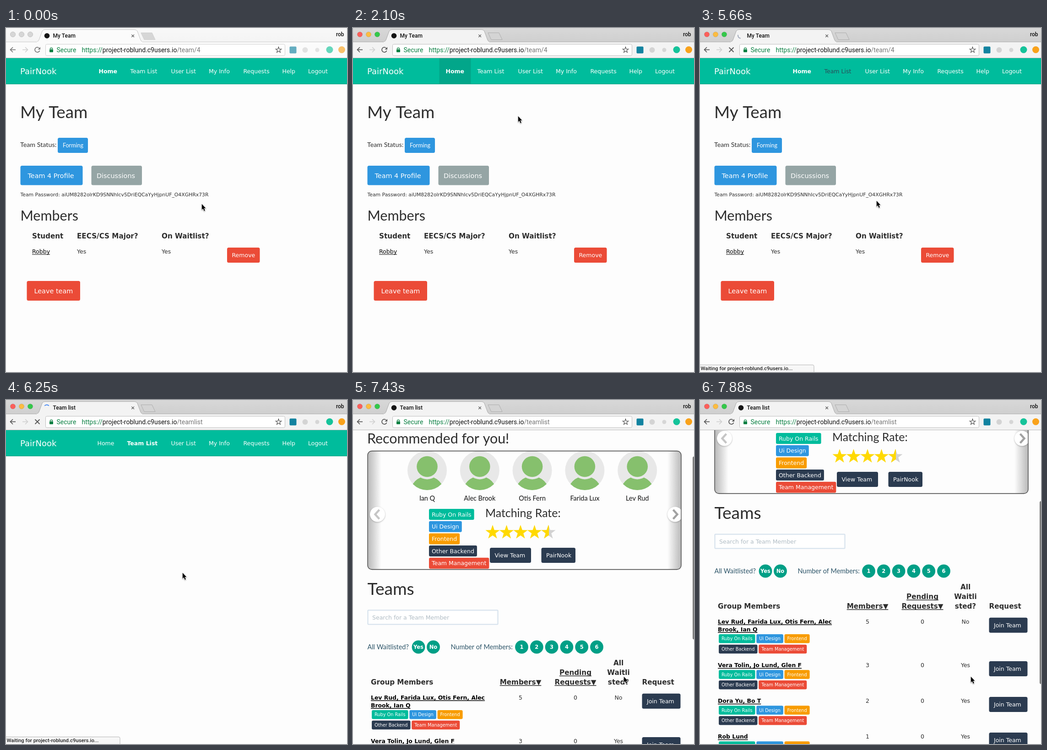
Recreate the animation shown at these times as an HTML page with a canvas. Size 745 by 752 pixels, loop 8 s.

```html
<!DOCTYPE html>
<html lang="en">
<head>
<meta charset="utf-8">
<title>My Team</title>
<style>
html, body { margin: 0; width: 100%; height: 100%; overflow: hidden; background: #fdfdfd; }
canvas { display: block; width: 745px; height: 752px; }
</style>
</head>
<body>
<canvas id="stage" width="745" height="752"></canvas>
<script>
const ctx = document.getElementById('stage').getContext('2d');
const LOOP = 8000, TICK = 148.5;
const TEAL = '#00bc9c', BLUE = '#2e96df', ORANGE = '#f89c00', NAVY = '#2b3b50',
      RED = '#eb4b37', GREY = '#95a5a5', INK = '#2d2d2d', WHITE = '#fff', PAGE = '#fdfdfd';
const HOST = 'project-roblund.c9users.io';

// Ticks at which the story moves on.
const FOCUS = 8, HOVER = 15, CLICK = 20, COMMIT = 42, PAINT = 43, LOADED = 46;

const cursorPath = [
  [8, 427, 384], [10, 392, 285], [13, 392, 285], [14, 360, 192], [15, 379, 99],
  [16, 342, 97], [18, 303, 96], [21, 303, 96], [24, 395, 262], [26, 385, 377],
  [43, 385, 377], [47, 591, 604]
];
const scrollPath = [[49, 0], [50, 96], [51, 194], [52, 237], [53, 262]];

const sans = px => `${px}px "DejaVu Sans", Verdana, sans-serif`;
const bold = px => 'bold ' + sans(px);
const lato = px => `${px}px Lato, sans-serif`;
const ui = px => `${px}px Roboto, sans-serif`;
const uiMedium = px => '500 ' + ui(px);

function along(path, tick) {
  if (tick <= path[0][0]) return path[0].slice(1);
  for (let i = 1; i < path.length; i++) {
    const [a, ...from] = path[i - 1], [b, ...to] = path[i];
    if (tick <= b) return from.map((v, k) => v + (to[k] - v) * (tick - a) / (b - a));
  }
  return path[path.length - 1].slice(1);
}

function text(str, x, y, font, color = INK, align = 'left') {
  ctx.font = font;
  ctx.fillStyle = color;
  ctx.textAlign = align;
  ctx.fillText(str, x, y);
  return ctx.measureText(str).width;
}

function underlined(str, x, y, font, color, align = 'left', thickness = 1.5) {
  const w = text(str, x, y, font, color, align);
  ctx.fillRect(align === 'center' ? x - w / 2 : x, y + 1.5, w, thickness);
}

function shape(fill, stroke, width = 1) {
  if (fill) { ctx.fillStyle = fill; ctx.fill(); }
  if (stroke) { ctx.strokeStyle = stroke; ctx.lineWidth = width; ctx.stroke(); }
}

function box(x, y, w, h, r, fill, stroke, width) {
  ctx.beginPath();
  ctx.roundRect(x, y, w, h, r);
  shape(fill, stroke, width);
}

function disc(x, y, r, fill, stroke, width) {
  ctx.beginPath();
  ctx.arc(x, y, r, 0, 2 * Math.PI);
  shape(fill, stroke, width);
}

function poly(points, fill, stroke, width, open) {
  ctx.beginPath();
  points.forEach(([x, y]) => ctx.lineTo(x, y));
  if (!open) ctx.closePath();
  shape(fill, stroke, width);
}

function star(x, y, r, fill, stroke, width) {
  poly(Array.from({ length: 10 }, (_, i) => {
    const a = i * Math.PI / 5 - Math.PI / 2, d = i % 2 ? r * 0.4 : r;
    return [x + d * Math.cos(a), y + d * Math.sin(a)];
  }), fill, stroke, width);
}

function button(label, x, y, w, h, color, font = sans(12.5), pad = 10.5, drop = 20.8) {
  box(x, y, w, h, 3.5, color);
  text(label, x + pad, y + drop, font, WHITE);
}

function tag(label, x, y, px, h) {
  const pad = 6;
  ctx.font = sans(px);
  const w = ctx.measureText(label).width + 2 * pad;
  box(x, y, w, h, 3, TAGS[label]);
  text(label, x + pad, y + h / 2 + px * 0.36, sans(px), WHITE);
  return w;
}

const TAGS = {
  'Ruby On Rails': TEAL, 'Ui Design': BLUE, 'Frontend': ORANGE,
  'Other Backend': NAVY, 'Team Management': RED
};

function navbar(tick) {
  ctx.fillStyle = TEAL;
  ctx.fillRect(0, 66, 745, 57);
  ctx.fillStyle = 'rgba(0,70,55,.25)';
  ctx.fillRect(0, 122, 745, 1);
  if (tick >= FOCUS && tick < CLICK) {
    ctx.fillStyle = '#02a68a';
    ctx.fillRect(188.5, 66, 69, 57);
  }
  text('PairNook', 31, 101, sans(18), WHITE);
  const listPage = tick >= COMMIT;
  const links = [['Home', listPage ? 199.5 : 202.5], ['Team List', listPage ? 264.5 : 271.5],
    ['User List', 360.5], ['My Info', 443], ['Requests', 518.5], ['Help', 603.5], ['Logout', 660]];
  const current = listPage ? 'Team List' : 'Home';
  const touched = tick === HOVER ? 'User List' : tick > HOVER && !listPage ? 'Team List' : '';
  for (const [name, x] of links) {
    text(name, x, 99, (name === current ? bold : sans)(12.5), name === touched ? '#2c4a58' : WHITE);
  }
}

function teamPage() {
  text('My Team', 31, 197, lato(36.8));
  text('Team Status:', 31, 260, lato(14.3));
  button('Forming', 113, 240, 66, 33, BLUE, lato(12.5), 11, 21);
  button('Team 4 Profile', 31.5, 301, 136, 42.5, BLUE, sans(14.4), 16, 26.5);
  button('Discussions', 186.5, 301, 110.5, 42.5, GREY, sans(14.4), 11.5, 26.5);
  text('Team Password: aiUM8282olrKD9SNNhIcv5DriEQCaYyHjpnUF_O4XGHRx73R', 31.5, 368, sans(10.85));
  text('Members', 31.5, 421, lato(30.5));
  [['Student', 57], ['EECS/CS Major?', 155], ['On Waitlist?', 340]]
    .forEach(([label, x]) => text(label, x, 460, bold(15.2)));
  underlined('Robby', 57, 493, sans(12.5), '#000', 'left', 1);
  text('Yes', 155, 493, sans(12.5));
  text('Yes', 340, 493, sans(12.5));
  button('Remove', 483, 480, 71.5, 33, RED);
  button('Leave team', 45.5, 553, 116.5, 43, RED, sans(14.4), 16, 27);
}

function avatar(name, x) {
  const y = 250, green = '#86c06d', pale = '#e8e8e8';
  ctx.save();
  disc(x, y, 43, pale);
  ctx.clip();
  disc(x, 299.5, 37, green);
  disc(x, 241.5, 28, pale);
  disc(x, 241.5, 22.8, green);
  ctx.restore();
  text(name, x, 316, lato(14.4), '#111', 'center');
}

function sideShade(x, outer, inner) {
  const g = ctx.createLinearGradient(outer, 0, inner, 0);
  g.addColorStop(0, '#b8b8b8');
  g.addColorStop(1, PAGE);
  ctx.fillStyle = g;
  ctx.fillRect(x, 207, 31, 260);
}

function arrowKnob(x, dir, color) {
  ctx.save();
  ctx.shadowColor = 'rgba(0,0,0,.28)';
  ctx.shadowBlur = 3;
  ctx.shadowOffsetY = 1;
  disc(x, 346, 16.5, WHITE);
  ctx.restore();
  poly([[x - 4 * dir, 336], [x + 5 * dir, 346], [x - 4 * dir, 356]], null, color, 4.5, true);
}

function carousel() {
  text('Recommended for you!', 31, 191, lato(30.4));
  ctx.save();
  ctx.beginPath();
  ctx.roundRect(32, 207.5, 685, 259, 9);
  ctx.clip();
  sideShade(32, 32, 62);
  sideShade(686, 717, 687);
  ['Ian Q', 'Alec Brook', 'Otis Fern', 'Farida Lux', 'Lev Rud']
    .forEach((name, i) => avatar(name, 162 + i * 114.8));
  arrowKnob(53.5, -1, '#c6c6c6');
  arrowKnob(703.5, 1, '#a2a2a2');
  ctx.restore();
  Object.keys(TAGS).forEach((label, i) => tag(label, 166, 334 + i * 26.7, 12.5, 24));
  text('Matching Rate:', 289, 352, lato(24.9));
  const starY = 385.5, starR = 16.4;
  for (let i = 0; i < 5; i++) star(305 + i * 30.5, starY, starR, i < 4 ? '#ffd900' : '#d2d2d2');
  ctx.save();
  ctx.beginPath();
  ctx.rect(408, 366, 20, 40);
  ctx.clip();
  star(427, starY, starR, '#ffd900');
  ctx.restore();
  button('View Team', 299, 419, 90, 33, NAVY);
  button('PairNook', 411.5, 419, 74.5, 33, NAVY);
  box(32, 207.5, 685, 259, 9, null, '#3a3a3a', 1.3);
}

function teamRow(names, y, members, waitlisted) {
  text(members, 366, y, sans(12.5), INK, 'center');
  text('0', 486, y, sans(12.5), INK, 'center');
  text(waitlisted, 580, y, sans(12.5), INK, 'center');
  button('Join Team', 631.5, y - 13.3, 84, 33, NAVY);
  names.forEach((line, i) => underlined(line, 39, y + i * 17, bold(12.4), '#000'));
  const top = y + 6 + (names.length - 1) * 17;
  let x = 41;
  Object.keys(TAGS).forEach((label, i) => {
    if (i === 3) x = 41;
    x += tag(label, x, top + (i > 2 ? 22.8 : 0), 9.75, 19.5) + 2.7;
  });
}

function teamTable() {
  text('Teams', 31.5, 522, lato(37.2));
  box(32.5, 555.5, 284, 31, 1, WHITE, '#d3e0ec', 2);
  text('Search for a Team Member', 42, 576, sans(12.5), '#b0bcc4');
  text('All Waitlisted?', 31.5, 640.5, lato(14.4), '#2c5468');
  text('Number of Members:', 213.5, 640.5, lato(14.4), '#2c5468');
  const pill = (label, x) => {
    disc(x, 636, 14.4, '#009f86');
    text(label, x, 640, bold(11.5), WHITE, 'center');
  };
  pill('Yes', 143);
  pill('No', 175.5);
  for (let i = 0; i < 6; i++) pill(String(i + 1), 368.5 + i * 32.8);

  const head = bold(15.2);
  text('Group Members', 39, 718, head);
  underlined('Members▼', 366, 718, head, INK, 'center');
  underlined('Pending', 486, 697, head, INK, 'center');
  underlined('Requests▼', 486, 718, head, INK, 'center');
  ['All', 'Waitli', 'sted?'].forEach((part, i) => text(part, 580, 676 + i * 21, head, INK, 'center'));
  text('Request', 631.5, 718, head);

  teamRow(['Lev Rud, Farida Lux, Otis Fern, Alec', 'Brook, Ian Q'], 751, '5', 'No');
  teamRow(['Vera Tolin, Jo Lund, Glen F'], 846.3, '3', 'Yes');
  teamRow(['Dora Yu, Bo T'], 924.3, '2', 'Yes');
  teamRow(['Rob Lund'], 1002.3, '1', 'Yes');
}

function spinner(tick) {
  const waiting = tick < COMMIT;
  const turn = waiting ? -(tick - 26) * TICK / 1320 : (tick - COMMIT) * TICK / 1000;
  const mid = -Math.PI / 2 + turn * 2 * Math.PI;
  ctx.beginPath();
  ctx.arc(89, 16.5, 6, mid - 0.9, mid + 0.9);
  shape(null, waiting ? '#9aa2b4' : '#4285f4', 1.8);
}

function tabStrip(tick, active) {
  const g = ctx.createLinearGradient(0, 0, 0, 30);
  g.addColorStop(0, active ? '#d8d8d8' : '#f8f8f8');
  g.addColorStop(1, active ? '#cfcfcf' : '#f4f4f4');
  ctx.fillStyle = g;
  ctx.fillRect(0, 0, 745, 31);
  const lights = active ? ['#fc5f5a', '#fdbc40', '#34c84a'] : Array(3).fill('#d6d6d6');
  lights.forEach((color, i) =>
    disc(15 + i * 19, 14, 5.6, color, active ? 'rgba(0,0,0,.12)' : '#c4c4c4'));

  const bar = active ? '#f3f3f3' : '#fbfbfb';
  ctx.fillStyle = bar;
  ctx.fillRect(0, 30, 745, 36);
  ctx.fillStyle = active ? '#b0b0b0' : '#cccccc';
  ctx.fillRect(0, 30, 745, 1);
  ctx.beginPath();
  ctx.moveTo(66, 31);
  ctx.quadraticCurveTo(70, 30, 72, 26);
  ctx.lineTo(79, 7);
  ctx.quadraticCurveTo(81, 3.5, 85, 3.5);
  ctx.lineTo(281, 3.5);
  ctx.quadraticCurveTo(285, 3.5, 287, 7);
  ctx.lineTo(294, 26);
  ctx.quadraticCurveTo(296, 30, 299, 31);
  shape(bar, active ? '#aaaaaa' : '#c4c4c4');
  ctx.fillStyle = bar;
  ctx.fillRect(67, 30, 231, 2);
  poly([[295, 10.5], [319, 10.5], [326, 25.5], [302, 25.5]],
    active ? '#d4d4d4' : '#d6d6d6', active ? '#aeaeae' : '#cfcfcf');

  if (tick >= CLICK && tick < LOADED) spinner(tick);
  else disc(89.5, 17, 5.8, '#151515');
  text(tick >= COMMIT ? 'Team list' : 'My Team', 102.5, 21, uiMedium(12), '#111');
  poly([[274.3, 14.3], [280, 20]], null, '#555', 1.2, true);
  poly([[280, 14.3], [274.3, 20]], null, '#555', 1.2, true);
  text('rob', 721, 18, uiMedium(12), '#111');
}

function navArrow(x, dir, color) {
  poly([[x - 6 * dir, 47.5], [x + 5.5 * dir, 47.5]], null, color, 1.7, true);
  poly([[x, 42], [x + 5.5 * dir, 47.5], [x, 53]], null, color, 1.7, true);
}

function toolbar(tick, active) {
  navArrow(15, -1, active ? '#555' : '#777');
  navArrow(42, 1, '#d0d0d0');
  if (tick >= CLICK && tick < LOADED) {
    poly([[63.5, 42.5], [73.5, 52.5]], null, '#555', 1.8, true);
    poly([[73.5, 42.5], [63.5, 52.5]], null, '#555', 1.8, true);
  } else {
    const color = active ? '#555' : '#777';
    ctx.beginPath();
    ctx.arc(68.5, 47.5, 5.4, 0.35, 5.4);
    shape(null, color, 1.7);
    poly([[75, 41.5], [75, 47], [69.5, 47]], color);
  }
  box(86.5, 35.5, 523, 25, 3, WHITE, active ? '#bdbdbd' : '#cfcfcf');
  box(95, 46.5, 8, 6.5, 1, '#0b8043');
  ctx.beginPath();
  ctx.arc(99, 46, 2.6, Math.PI, 0);
  shape(null, '#0b8043', 1.4);
  let x = 165.5;
  text('Secure', 110.5, 53, ui(14), '#0b8043');
  const path = tick >= COMMIT ? '/teamlist' : '/team/4';
  for (const [part, color] of [['https', '#0b8043'], ['://', '#0b8043'], [HOST, '#111'], [path, '#777']]) {
    x += text(part, x, 53, ui(14), color);
  }
  star(595.5, 48, 6.6, null, '#555', 1.2);
  ctx.globalAlpha = active ? 1 : 0.65;
  box(619.5, 40.5, 15, 15, 2, '#1283a0');
  disc(653.5, 48, 6, '#d4d4d4');
  disc(680, 48, 4.5, '#d6d6d6');
  disc(707, 47.5, 7.5, '#15c39a');
  disc(733.5, 47.5, 7.5, '#f9a21b');
  ctx.globalAlpha = 1;
}

function statusBar(tick) {
  if (tick < HOVER || tick >= PAINT) return;
  box(-1, 736.5, 250, 18, [0, 3, 0, 0], '#f7f7f7', '#b4b4b4');
  const link = `https://${HOST}/` + (tick === HOVER ? 'userlist' : 'teamlist');
  text(tick < CLICK ? link : `Waiting for ${HOST}...`, 1.5, 748, uiMedium(11.3), '#222');
}

function pointer(x, y, overLink) {
  ctx.save();
  ctx.translate(x, y);
  ctx.lineJoin = 'round';
  if (overLink) {
    ctx.beginPath();
    ctx.roundRect(-1.5, 0, 3.5, 11, 1.7);
    ctx.roundRect(-3.5, 6.5, 12, 9, 3);
    shape(null, '#000', 2);
    shape(WHITE);
  } else {
    const arrow = [[0.8, 0.8], [0.8, 13.4], [3.6, 10.8], [5.8, 16], [7.9, 15.1], [5.7, 10], [9.4, 10]];
    ctx.shadowColor = 'rgba(0,0,0,.3)';
    ctx.shadowBlur = 2;
    ctx.shadowOffsetY = 1;
    poly(arrow, WHITE, WHITE, 1.8);
    ctx.shadowColor = 'transparent';
    poly(arrow, '#000');
  }
  ctx.restore();
}

function draw(time) {
  const tick = Math.floor(time % LOOP / TICK);
  const active = tick >= FOCUS;
  const [scroll] = along(scrollPath, tick);
  const [x, y] = along(cursorPath, tick);

  ctx.fillStyle = PAGE;
  ctx.fillRect(0, 0, 745, 752);
  ctx.save();
  ctx.translate(0, -scroll);
  navbar(tick);
  if (tick < COMMIT) teamPage();
  if (tick >= PAINT) {
    carousel();
    teamTable();
  }
  ctx.restore();
  if (scroll > 0) box(742, 67 + scroll * 0.588, 7, 400, 3.5, '#7f7f7f');

  tabStrip(tick, active);
  toolbar(tick, active);
  ctx.fillStyle = '#b9b9b9';
  ctx.fillRect(0, 65, 745, 1);
  statusBar(tick);
  pointer(x, y, y < 110);
}

function loop(now) {
  draw(now);
  requestAnimationFrame(loop);
}
draw(0);
requestAnimationFrame(loop);
</script>
</body>
</html>
```
